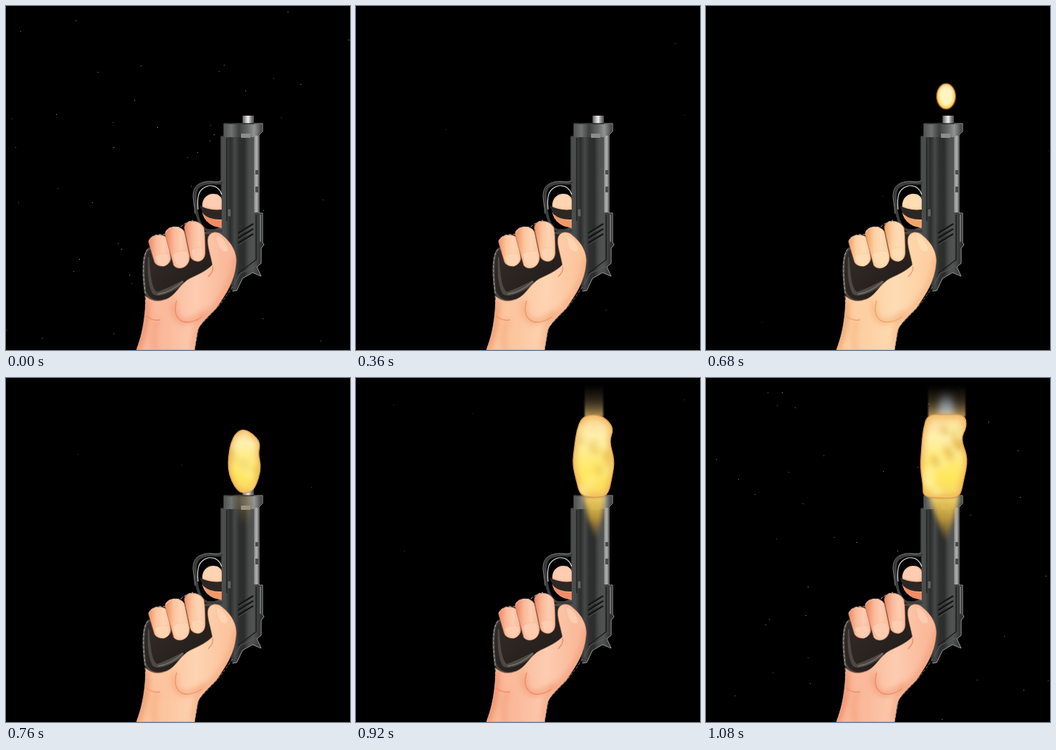
An HTML page with a canvas that plays this animation: 480 by 480 pixels, repeating every 1.12 s.

```html
<!DOCTYPE html>
<html lang="en">
<head>
<meta charset="utf-8">
<title>Starting shot</title>
<style>
html, body { margin: 0; width: 100%; height: 100%; overflow: hidden; background: #000; }
canvas { display: block; width: 100vmin; height: 100vmin; }
</style>
</head>
<body>
<canvas width="480" height="480"></canvas>
<script>
const ctx = document.querySelector('canvas').getContext('2d');
const LOOP = 1120, STEP = 40;

const lerp = (a, b, p) => a + (b - a) * p;
const clamp = v => Math.max(0, Math.min(1, v));
const ramp = (t, a, b) => clamp((t - a) / (b - a));
const easeOut = p => p * (2 - p);

function shape(d, fill, stroke, width = 1, dash = []) {
  const path = new Path2D(d);
  if (fill) { ctx.fillStyle = fill; ctx.fill(path); }
  if (stroke) {
    ctx.strokeStyle = stroke;
    ctx.lineWidth = width;
    ctx.setLineDash(dash);
    ctx.stroke(path);
  }
}

function gradient(x0, y0, x1, y1, ...colors) {
  const g = ctx.createLinearGradient(x0, y0, x1, y1);
  colors.forEach((c, i) => g.addColorStop(i / (colors.length - 1), c));
  return g;
}

function soft(radius, draw) {
  ctx.save();
  ctx.filter = `blur(${radius}px)`;
  draw();
  ctx.restore();
}

function seeded(seed) {
  let s = seed * 7919 + 17;
  return () => (s = (s * 16807) % 2147483647) / 2147483647;
}

function drawSpecks(t) {
  const rnd = seeded(t / STEP + 3);
  for (let i = 0; i < 8; i++) rnd();
  const near = clamp(Math.exp(-t / 120) + Math.exp((t - 1080) / 60));
  const count = 3 + Math.round(41 * near);
  for (let i = 0; i < count; i++) {
    const x = Math.floor(rnd() * 480), y = Math.floor(rnd() * 475) + 4;
    ctx.fillStyle = `rgba(210,210,210,${lerp(0.3, 0.65, near) * lerp(0.6, 1.2, rnd())})`;
    ctx.fillRect(x, y, 1, 1);
  }
}

const GUN = 'M304 164H358V175L353 180V289H358V330L360 333L356 338V359L350 364L356 377L344 372' +
  'L330 380L322 397L316 398L300 340L278 316L300 308V182H304Z';
const GUN_RIM = 'M346 164H358V175L353 180V289H358V330L360 333L356 338V359L350 364L356 377L344 372L330 380L322 397L316 398';
const GUARD = 'M302 246C297 249 291 246 284 247C269 248 264 254 264 266C265 291 270 310 281 313L302 314';
const GRIP = 'M199 339C190 347 191 373 194 398Q199 411 212 412Q238 410 263 390L297 364L292 318L265 315Z';
const HAND = 'M182 480C189 461 194 441 195 405Q207 416 224 409C238 403 242 388 257 380C270 374 282 368 288 361' +
  'C285 345 280 333 282 323C285 314 296 314 302 320C316 331 323 346 321 360' +
  'C319 384 307 402 294 421C283 433 269 444 267 455L263 480Z';
const FINGERS = [
  'M199 330C199 318 221 316 226 325L230 352C229 364 212 367 207 357Z',
  'M222 319C221 308 242 303 249 315L256 348C258 364 241 371 234 362Z',
  'M249 311C247 299 267 295 276 309Q278 318 278 345C277 360 260 359 257 349Z'
];
const NAILS = [
  'M208 350Q218 342 227 347Q230 360 220 363Q211 363 208 350Z',
  'M233 347Q243 338 253 343Q258 359 248 364Q236 366 233 347Z',
  'M259 341Q267 334 275 339Q277 353 269 356Q260 356 259 341Z',
  'M293 320Q302 320 309 335Q312 344 304 343Q295 340 293 320Z'
];

function drawGun() {
  shape('M330 153H346V165H330Z', gradient(330, 0, 346, 0, '#555', '#aaa', '#f0f0f0', '#888', '#444'));
  shape(GUN, gradient(300, 0, 358, 0, '#4d4f4f', '#4a4c4c', '#2b2c2c', '#474949', '#2e2f2f',
    '#2b2c2c', '#4b4d4d', '#525454', '#3d3e3e', '#2c2d2d'), '#1b1b1b');
  shape('M304 165H357V174L352 180V183H304Z', gradient(304, 0, 357, 0, '#505252', '#707272', '#3d3f3f', '#606262', '#929494', '#444'));
  shape('M328 178H341V184H328Z', '#8b8d8d');
  shape('M308 184V300', null, '#222323', 1.5);
  shape('M346 181H352V288H346Z', gradient(346, 0, 352, 0, '#777', '#b2b3b3', '#8b8c8c'));
  shape('M348 229H352V235H348ZM348 252H352V260H348Z', '#4b4c4c');
  shape('M309 283H314V294H309Z', '#626464', '#292a2a');
  shape('M324 317L345 304M324 324L345 311M324 331L345 318', null, '#151616', 2.5);
  shape('M325 319L345 306M325 326L345 313M325 333L345 320', null, '#5a5c5c', 0.8);
  shape('M349 291V354L324 373', null, '#1c1d1d', 1.5);
  shape('M355 291V329', null, '#707272', 2);
  shape('M318 389L327 373L349 363', null, '#5a5c5c');
  shape(GUN_RIM, null, '#a8a8a8', 0.9);
  shape('M300 244V182H304V164H330', null, '#666', 0.7);
}

function drawHand(skin, shade, pale) {
  // Trigger finger, trigger and guard
  shape('M274 281C272 257 301 258 301 271V309L290 307Q277 301 274 289Z', skin);
  shape('M275 278C275 259 300 259 300 272L299 282Q286 284 275 278Z', pale);
  shape('M275 290Q286 299 301 299V310L290 307Q278 302 275 290Z', shade);
  shape('M270 278Q283 286 301 284V298Q285 299 275 290Z', '#2d2724');
  shape(GUARD, null, '#3c3e3e', 4);
  shape('M300 244C294 247 287 244 280 245C267 247 261 253 261 266L264 290', null, '#aaa', 0.8);
  shape('M268 284C266 264 269 255 282 251Q296 249 301 263', null, '#ddd', 1.2);

  // Grip
  shape(GRIP, gradient(195, 345, 260, 405, '#332b28', '#2b2421', '#221e1c'), '#4c4a47', 3);
  shape('M198 350Q196 388 205 402Q214 409 241 393Q251 385 246 383Q225 394 211 399Q202 396 200 351Z', '#4d4844');
  shape('M212 402Q229 400 247 384', null, '#77716b', 1.5);

  // Palm, thumb and wrist
  shape(HAND, gradient(185, 0, 305, 0, skin, skin, pale, skin), '#b97858', 0.6);
  ctx.save();
  ctx.clip(new Path2D(HAND));
  soft(4, () => {
    shape('M321 350Q317 405 267 442L261 480', null, shade, 4);
    shape('M194 409Q199 440 181 482', null, shade, 9);
    shape('M211 438Q203 462 209 482', null, shade, 3);
    shape('M235 412Q232 438 248 441Q262 440 278 427', null, shade, 4);
  });
  ctx.restore();
  soft(0.7, () => {
    shape('M238 411Q232 433 246 440Q258 444 273 434', null, shade, 1.5);
    shape('M195 432Q204 440 215 438M288 363Q291 369 282 378', null, shade, 1.5);
  });

  FINGERS.forEach((d, i) => {
    const x = 200 + 25 * i;
    shape(d, gradient(x, 0, x + 29, 0, shade, skin, pale, skin), '#a8694e', 0.7);
  });
  NAILS.forEach(d => shape(d, pale, skin, 0.8));
  shape('M198 339C190 347 191 373 194 398L195 432Q192 455 182 480', null, '#bbb', 0.8, [4, 2]);
  shape('M199 329Q204 317 222 319Q225 306 243 309Q250 302 261 299', null, '#ddd', 0.8, [4, 2]);
  shape('M316 392Q302 413 292 424L269 448L263 480', null, '#aaa', 0.7, [4, 2]);
}

// Flame outlines run clockwise from the top, 14 points each
const oval = (cx, cy, rx, ry) => Array.from({ length: 14 }, (_, i) => {
  const a = i / 7 * Math.PI;
  return [cx + rx * Math.sin(a), cy - ry * Math.cos(a)];
});
const FLAMES = [
  [640, oval(336, 134, 7, 9)],
  [680, oval(335, 126, 13.8, 18.5)],
  [840, [[330, 59], [345, 67], [358, 82], [353, 100], [358, 120], [355, 140], [347, 161],
    [334, 167], [322, 163], [311, 145], [306, 125], [307, 105], [310, 83], [318, 66]]],
  [920, [[330, 51], [346, 54], [360, 70], [353, 88], [361, 115], [357, 140], [351, 165],
    [332, 167], [313, 164], [308, 145], [302, 120], [305, 95], [308, 73], [315, 55]]],
  [1080, [[334, 51], [361, 51], [364, 68], [355, 85], [366, 112], [359, 145], [354, 167],
    [332, 168], [303, 166], [303, 150], [299, 125], [301, 95], [303, 72], [309, 51]]]
];

function flamePath(t) {
  let i = 0;
  while (i < FLAMES.length - 2 && t >= FLAMES[i + 1][0]) i++;
  const [t0, from] = FLAMES[i], [t1, to] = FLAMES[i + 1];
  const p = easeOut(ramp(t, t0, t1));
  const pts = from.map(([x, y], j) => [lerp(x, to[j][0], p), lerp(y, to[j][1], p)]);
  const path = new Path2D();
  const middle = ([ax, ay], [bx, by]) => [(ax + bx) / 2, (ay + by) / 2];
  path.moveTo(...middle(pts.at(-1), pts[0]));
  pts.forEach((pt, j) => path.quadraticCurveTo(...pt, ...middle(pt, pts[(j + 1) % pts.length])));
  path.closePath();
  return path;
}

function drawGlow(t, late) {
  const w = lerp(13, 21, late), end = lerp(211, 232, ramp(t, 840, 940));
  ctx.globalAlpha = ramp(t, 740, 840);
  soft(3, () => shape(`M${332 - w} 164H${332 + w}L${334 + w * 0.6} 192L335 ${end}L${331 - w * 0.45} 195Z`,
    gradient(0, 164, 0, end, '#f5d765', '#c89e3ce0', '#a8803000')));
  ctx.globalAlpha = 1;
}

function drawColumn(t) {
  const alpha = ramp(t, 860, 920), p = ramp(t, 920, 1080);
  const left = lerp(319, 310, p), right = lerp(345, 362, p);
  ctx.globalAlpha = alpha;
  soft(1, () => shape(`M${left} 9H${right}V54H${left}Z`, gradient(0, 9, 0, 54, '#40362800', '#5b4c3488', '#b69554')));
  ctx.globalAlpha = alpha * p * 0.8;
  soft(5, () => shape('M327 20H343L347 57H323Z', gradient(0, 18, 0, 56, '#65708000', '#8b9caf', '#e4dfc5')));
  ctx.globalAlpha = 1;
}

function drawFlame(t) {
  if (t < 640) return;
  const grow = easeOut(ramp(t, 680, 840)), late = ramp(t, 840, 1080);
  drawGlow(t, late);
  drawColumn(t);

  const path = flamePath(t);
  const top = lerp(108, 54, grow), bottom = lerp(144, 167, grow);
  shape(path, gradient(0, top, 0, bottom, '#fbd895', '#fff0ae', '#ffec80', '#ffe75c', '#f7d768'));
  ctx.save();
  ctx.clip(path);
  soft(lerp(2, 4, grow), () => {
    shape(path, null, '#eeb057', lerp(4, 7, grow));
    for (let i = 0; i < 13 * grow; i++) {
      const x = 332 + 22 * Math.sin(i * 2.4 + t / 170);
      const y = 62 + (i * 37 + 200 - t / 12) % 100;
      ctx.globalAlpha = lerp(0.3, 0.6, late);
      ctx.fillStyle = i % 3 ? '#fff4a5' : '#dfad42';
      ctx.beginPath();
      ctx.ellipse(x, y, 5 + i % 4, 8 + i % 5, i, 0, 7);
      ctx.fill();
    }
    // Pale core of the first burst
    ctx.globalAlpha = 1 - grow;
    ctx.fillStyle = '#fff5c4';
    ctx.beginPath();
    ctx.ellipse(335, 126, 9, 14, 0, 0, 7);
    ctx.fill();
  });
  ctx.restore();
  soft(0.6, () => shape(path, null, grow < 0.5 ? '#8a4a16' : '#d99b50', 1.4));
}

function draw(now) {
  const phase = now % LOOP;
  const t = phase < 80 ? 0 : Math.floor(phase / STEP) * STEP;
  const warm = ramp(t, 0, 680) * (1 - ramp(t, 680, 840));
  const tone = (a, b) => `rgb(${a.map((v, i) => Math.round(lerp(v, b[i], warm)))})`;

  ctx.fillStyle = '#000';
  ctx.fillRect(0, 0, 480, 480);
  drawSpecks(t);
  drawGun();
  drawHand(
    tone([250, 186, 155], [253, 208, 163]),
    tone([240, 141, 103], [242, 164, 109]),
    tone([253, 204, 177], [254, 220, 180])
  );
  drawFlame(t);
}

const start = performance.now();
function tick() {
  draw(performance.now() - start);
  requestAnimationFrame(tick);
}
tick();
</script>
</body>
</html>
```
